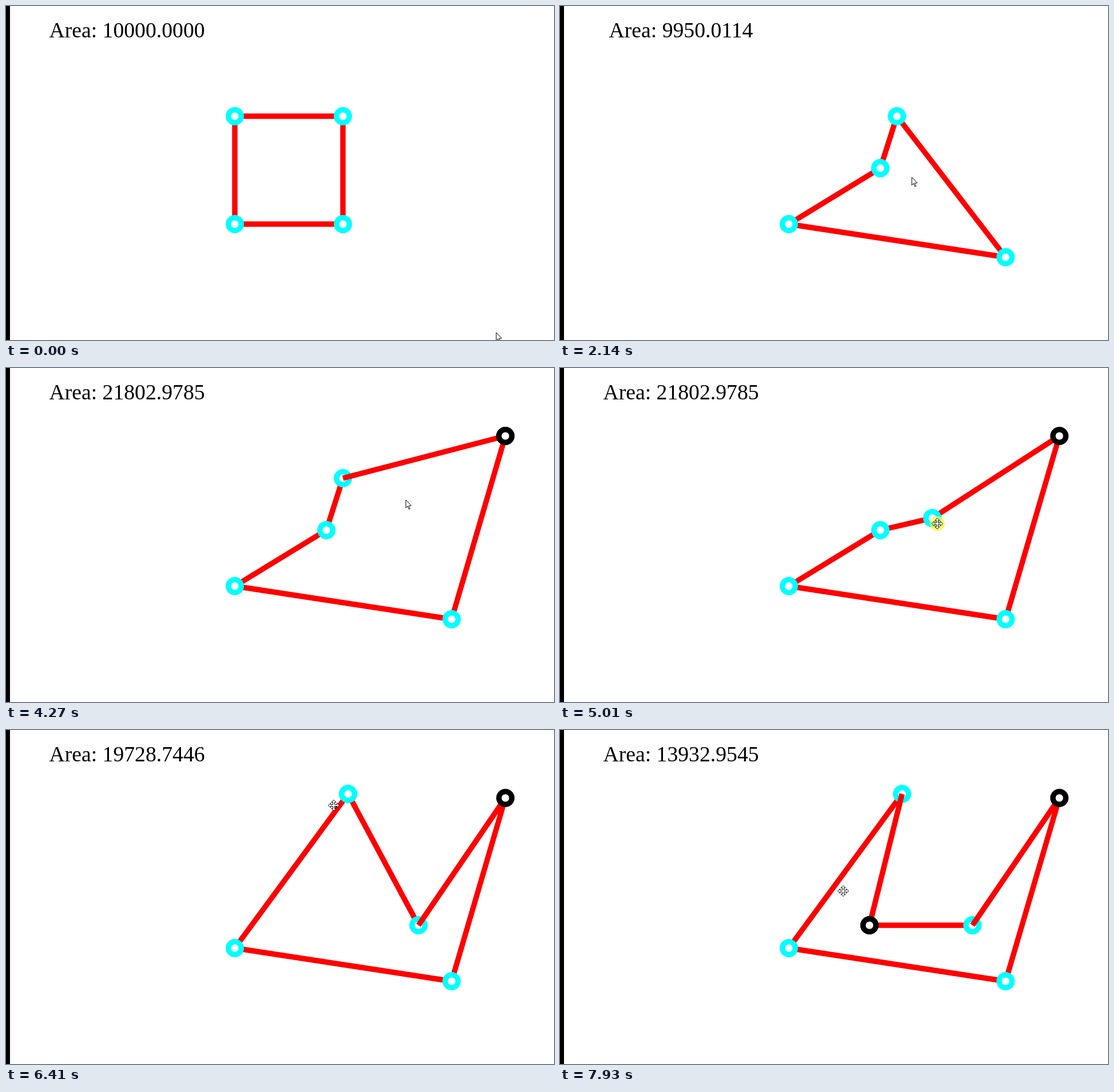
These frames come from a looping animation (958 by 585 pixels, 7.99 s). An HTML page with a canvas:

```html
<!DOCTYPE html>
<html lang="en">
<head>
<meta charset="utf-8">
<title>Polygon area</title>
<style>
  html, body { margin: 0; width: 100%; height: 100%; overflow: hidden; background: #fff; }
  canvas { display: block; }
</style>
</head>
<body>
<canvas id="stage" width="958" height="585"></canvas>
<script>
const ctx = document.getElementById('stage').getContext('2d');
const LOOP = 7990, LAG = 40;
const CYAN = '#0ff', RED = '#f00', BLACK = '#000';
const LEFT = 400, TOP = 193, SIDE = 189;

// Pointer stops; a stop with a vertex drags it there and then shows the new area
const stops = [
  { t: 0, at: [857, 572] },
  { t: 410, at: [589, 382] },
  { t: 880, at: [779, 440], vertex: 2, area: '16598.4914' },
  { t: 1330, at: [365, 199] },
  { t: 1510, at: [400, 193] },
  { t: 1910, at: [560, 284], vertex: 0, area: '9950.0114' },
  { t: 2420, at: [688, 321] },
  { t: 2830, at: [688, 321] },
  { t: 3203, at: [873, 119], vertex: 4, area: '21802.9785' },
  { t: 3640, at: [745, 240] },
  { t: 4270, at: [699, 231] },
  { t: 4530, at: [589, 193] },
  { t: 5450, at: [721, 342], vertex: 1, area: '12206.3730' },
  { t: 5740, at: [560, 284] },
  { t: 6280, at: [598, 112], vertex: 0, area: '19728.7446' },
  { t: 6410, at: [573, 132] },
  { t: 7000, at: [660, 227] },
  { t: 7700, at: [541, 342], vertex: 5, area: '13932.9545' },
  { t: 7930, at: [495, 282] }
];

const clamp = (x, lo, hi) => Math.max(lo, Math.min(hi, x));
const ease = u => u * u * (3 - 2 * u);

// Position on the way from stop a to stop b
function between(a, b, t) {
  const p = ease(clamp((t - a.t) / (b.t - a.t), 0, 1));
  return a.at.map((from, i) => from + (b.at[i] - from) * p);
}

function pointer(t) {
  const i = stops.findIndex(s => s.t > t);
  return i < 0 ? stops.at(-1).at : between(stops[i - 1], stops[i], t);
}

function line(a, b) {
  ctx.beginPath();
  ctx.moveTo(...a);
  ctx.lineTo(...b);
  ctx.strokeStyle = RED;
  ctx.lineWidth = 9.4;
  ctx.stroke();
}

function disc([x, y], r, fill) {
  ctx.beginPath();
  ctx.arc(x, y, r, 0, 2 * Math.PI);
  ctx.fillStyle = fill;
  ctx.fill();
}

function ring(p, color) {
  disc(p, 16, color);
  disc(p, 6.6, '#fff');
}

function shape([x, y], points) {
  ctx.beginPath();
  for (const [dx, dy] of points) ctx.lineTo(x + dx, y + dy);
  ctx.closePath();
  ctx.fillStyle = '#fff';
  ctx.fill();
  ctx.strokeStyle = BLACK;
  ctx.lineWidth = 1;
  ctx.stroke();
}

const arrow = [[0, 0], [0, 14], [3, 11], [5.5, 16.5], [7.5, 15.5], [5, 10.5], [9.5, 10]];
const cross = [];
let arm = [[0, -9.5], [4, -5.5], [1.5, -5.5], [1.5, -1.5], [5.5, -1.5], [5.5, -4]];
for (let i = 0; i < 4; i++) {
  cross.push(...arm);
  arm = arm.map(([x, y]) => [-y, x]);
}

function nearEdge(p, edges, pts) {
  ctx.beginPath();
  for (const [a, b] of edges) {
    ctx.moveTo(...pts[a]);
    ctx.lineTo(...pts[b]);
  }
  ctx.lineWidth = 40;
  return ctx.isPointInStroke(...p);
}

function draw(t) {
  const right = LEFT + SIDE, bottom = TOP + SIDE;
  const pts = [[LEFT, TOP], [right, TOP], [right, bottom], [LEFT, bottom]];
  let area = '10000.0000', top = -1, pressed = false;
  stops.forEach((stop, i) => {
    const v = stop.vertex, from = stops[i - 1];
    // A new vertex appears just before it is dragged
    if (v === undefined || t < from.t - (v > 3 ? 60 : 0)) return;
    const dropped = t >= stop.t + LAG;
    pts[v] = between(from, stop, t - LAG);
    top = v;
    pressed = !dropped;
    if (dropped) area = stop.area;
  });

  ctx.fillStyle = '#fff';
  ctx.fillRect(0, 0, 958, 585);
  ctx.fillStyle = BLACK;
  ctx.fillRect(0, 0, 7, 585);
  ctx.font = '37.7px "Liberation Serif", "Times New Roman", serif';
  ctx.textAlign = 'center';
  ctx.fillText('Area: ' + area, 211.5, 55);

  const edges = [[pts[5] ? 5 : 0, 1], [pts[4] ? 4 : 1, 2], [2, 3], [3, 0]];
  for (const [a, b] of edges) line(pts[a], pts[b]);
  for (let i = 0; i < 4; i++) ring(pts[i], CYAN);
  for (const [from, v] of [[1, 4], [0, 5]]) {
    if (!pts[v]) continue;
    edges.push([from, v]);
    line(pts[from], pts[v]);
    ring(pts[v], BLACK);
  }
  // The vertex touched last stays in front
  if (top >= 0) ring(pts[top], top < 4 ? CYAN : BLACK);

  const p = pointer(t);
  if (pressed) disc(p, 13, 'rgba(255,244,60,.75)');
  shape(p, pressed || nearEdge(p, edges, pts) ? cross : arrow);
}

const start = performance.now();
function tick() {
  draw((performance.now() - start) % LOOP);
  requestAnimationFrame(tick);
}
tick();
</script>
</body>
</html>
```
